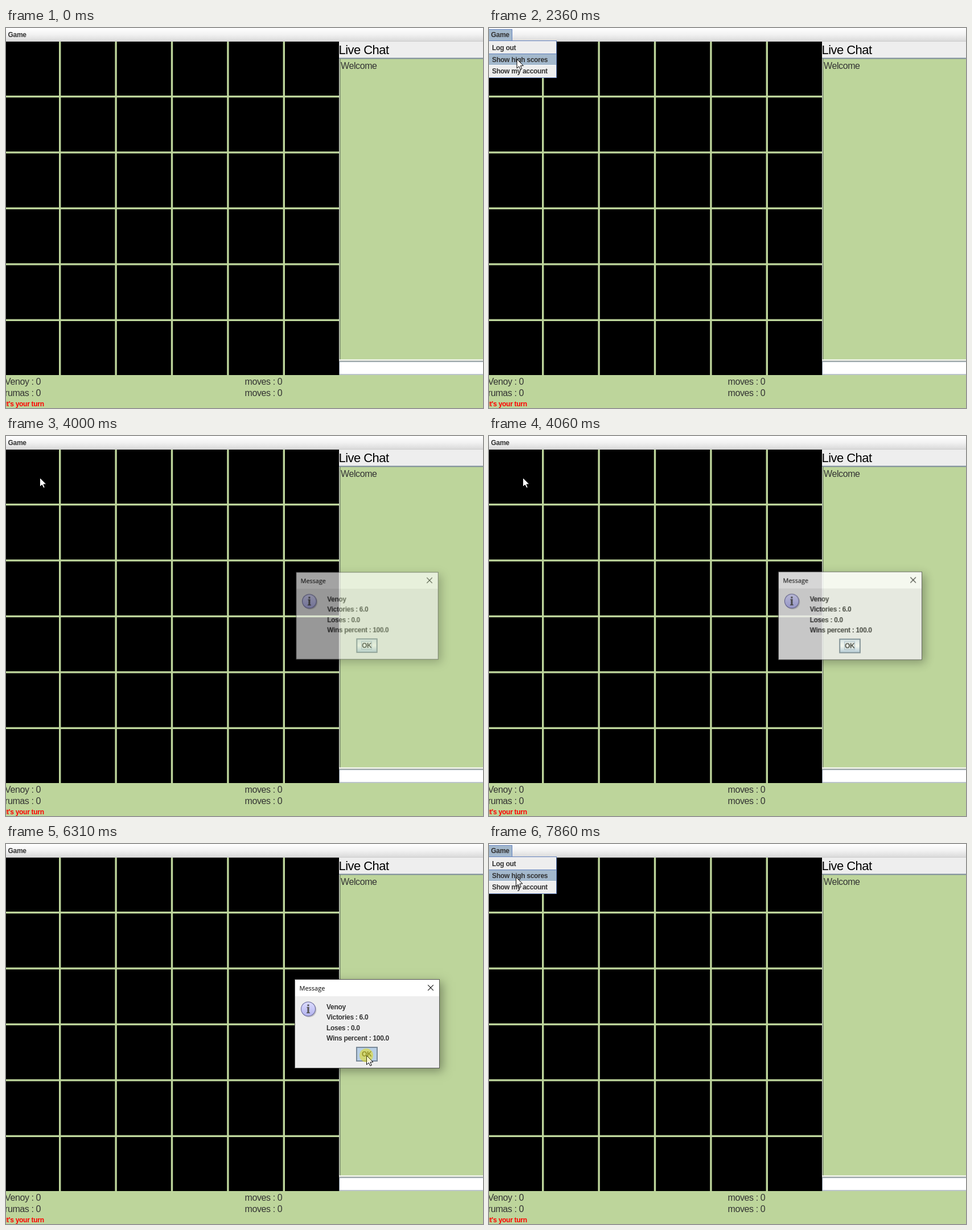
An HTML page with a canvas for the animation above (8 s loop, 838x669 px).

```html
<!DOCTYPE html>
<html lang="en">
<head>
<meta charset="utf-8">
<title>Memory game</title>
<style>
html, body { margin: 0; width: 100%; height: 100%; overflow: hidden; background: #bdd59b; }
canvas { display: block; width: 838px; height: 669px; }
</style>
</head>
<body>
<canvas id="stage" width="838" height="669"></canvas>
<script>
const W = 838, H = 669, LOOP = 8000, STEP = 77;
const GREEN = '#bdd59b', STEEL = '#7a8a99', BLUE = '#6382bf', SELECT = '#a3b8cc', INK = '#333';
const PLAYER = 'Venoy', RIVAL = 'rumas';
const ITEMS = ['Log out', 'Show high scores', 'Show my account'];
const MENU_OPEN = 1820, MENU_PICK = 3760, CONFIRM = 6310, MENU_AGAIN = 7250;
const CLICKS = [MENU_OPEN, MENU_PICK, CONFIRM, MENU_AGAIN];

// Pointer glides; bow lifts the middle of the path
const ENTRY = { x: 980, y: 875 };
const GLIDES = [
  { from: 360, to: 1120, x: 41, y: 11, bow: 40 },
  { from: 1200, to: 1590, x: 16, y: 12, bow: 10 },
  { from: 2210, to: 2750, x: 59, y: 73, bow: 4 },
  { from: 4920, to: 5460, x: 633, y: 372, bow: 0 },
  { from: 6388, to: 6700, x: -40, y: 30, bow: 0 },
  { from: 7000, to: 7080, x: 24, y: 12, bow: 0 },
  { from: 7402, to: 7860, x: 47, y: 58, bow: 0 }
];

const ctx = document.getElementById('stage').getContext('2d');
const layer = document.createElement('canvas');
layer.width = W;
layer.height = H;
const dlg = layer.getContext('2d');

const easeOut = (p, power) => 1 - (1 - p) ** power;
const within = (t, start, length) => t >= start && t < start + length;

function progress(t, from, to) {
  if (t < from) return 0;
  const n = Math.round((to - from) / STEP);
  const k = Math.floor((t - from + 12) / (to - from) * n);
  return Math.min(1, (k + 1) / (n + 1));
}

function pointerAt(t) {
  return GLIDES.reduce((pos, g) => {
    const p = progress(t, g.from, g.to), e = easeOut(p, 3);
    return {
      x: pos.x + (g.x - pos.x) * e,
      y: pos.y + (g.y - pos.y) * e - g.bow * Math.sin(Math.PI * p)
    };
  }, ENTRY);
}

function dialogAlpha(t) {
  return easeOut(progress(t, 3913, 4220), 2) - easeOut(progress(t, 6388, 6700), 2);
}

function rect(c, x, y, w, h, fill) {
  c.fillStyle = fill;
  c.fillRect(x, y, w, h);
}

function text(c, str, x, y, size, weight = 'normal', fill = INK) {
  c.font = `${weight} ${size}px "Liberation Sans", Arial, sans-serif`;
  c.letterSpacing = `${-.025 * size}px`;
  c.fillStyle = fill;
  c.fillText(str, x, y);
}

function disc(c, x, y, r, fill) {
  c.fillStyle = fill;
  c.beginPath();
  c.arc(x, y, r, 0, 7);
  c.fill();
}

function vertical(c, y0, y1, ...colors) {
  const g = c.createLinearGradient(0, y0, 0, y1);
  colors.forEach((color, i) => g.addColorStop(i / (colors.length - 1), color));
  return g;
}

function drawBoard() {
  const pitch = 98.4, gap = 3.4;
  rect(ctx, 0, 24, 585, 587, '#000');
  for (let i = 0; i < 5; i++) {
    rect(ctx, 93 + i * pitch, 24, gap, 587, GREEN);
    rect(ctx, 0, 119 + i * pitch, 585, gap, GREEN);
  }
}

function drawChat() {
  rect(ctx, 585, 24, 253, 29, '#eee');
  text(ctx, 'Live Chat', 584.5, 46, 22, 'normal', '#000');
  rect(ctx, 585, 52.5, 253, 2, STEEL);
  rect(ctx, 585, 54, 1, 530, '#dfe6d6');
  rect(ctx, 586, 54, 1.5, 530, '#75846b');
  text(ctx, 'Welcome', 588, 71.5, 16);
  rect(ctx, 585, 583.5, 253, 27.5, '#fff');
  rect(ctx, 585, 585.5, 253, 1, '#8b9684');
  rect(ctx, 585, 587, 253, 1, STEEL);
  rect(ctx, 585, 587, 1, 24, STEEL);
  rect(ctx, 585, 609.5, 253, 1, STEEL);
}

function drawWindow() {
  rect(ctx, 0, 0, W, H, GREEN);
  rect(ctx, 0, 0, W, 23, vertical(ctx, 0, 23, '#fff', '#f2f2f2', '#dadada'));
  rect(ctx, 0, 23, W, 1, '#ccc');
  text(ctx, 'Game', 3.5, 16.3, 12, 'bold');
  drawBoard();
  drawChat();
  [PLAYER, RIVAL].forEach((name, i) => {
    const y = 627.5 + i * 20.5;
    text(ctx, `${name} : 0`, -2, y, 16);
    text(ctx, 'moves : 0', 419.5, y, 16);
  });
  text(ctx, "it's your turn", -2, 666, 12, 'bold', '#f00');
}

function drawMenu(y) {
  const row = 20.4;
  rect(ctx, 0, 2, 41, 21, BLUE);
  rect(ctx, 0, 3, 40, 19, SELECT);
  text(ctx, 'Game', 3.5, 16.3, 12, 'bold');
  rect(ctx, 0, 22, 119, 66, BLUE);
  rect(ctx, 0, 23, 118, 64, '#eee');
  const hover = Math.floor((y - 25) / row);
  ITEMS.forEach((label, i) => {
    const top = 25 + Math.round(i * row);
    if (i === hover) {
      rect(ctx, 0, top, 118, 20, SELECT);
      rect(ctx, 0, top, 118, 1, BLUE);
      rect(ctx, 0, top + 20, 118, 1, '#fff');
    }
    text(ctx, label, 5.3, 39.4 + i * row, 12, 'bold');
  });
}

function drawInfoIcon(x, y) {
  disc(dlg, x + 1.5, y + 1.5, 13, '#c4c4c8');
  disc(dlg, x, y, 13, '#666699');
  disc(dlg, x, y, 12, vertical(dlg, y - 12, y + 12, '#dcdcff', '#b4b4ee'));
  rect(dlg, x - 1.5, y - 8, 3, 3, '#555');
  rect(dlg, x - 2.5, y - 3.5, 4, 1.5, '#555');
  rect(dlg, x - 1.5, y - 3.5, 3, 10, '#555');
  rect(dlg, x - 3, y + 6, 6, 1.5, '#555');
}

function drawCross(x, y, r) {
  dlg.strokeStyle = '#111';
  dlg.lineWidth = 1.1;
  dlg.beginPath();
  for (const side of [-1, 1]) {
    dlg.moveTo(x - r, y - r * side);
    dlg.lineTo(x + r, y + r * side);
  }
  dlg.stroke();
}

function drawButton(pressed) {
  rect(dlg, 615, 357, 38, 26, STEEL);
  rect(dlg, 617, 359, 34, 22,
    pressed ? '#b8cfe5' : vertical(dlg, 359, 381, '#dde8f3', '#fff', '#b8cfe5'));
  if (!pressed) {
    dlg.strokeStyle = SELECT;
    dlg.lineWidth = 1;
    dlg.strokeRect(624.5, 362.5, 18, 14);
  }
  text(dlg, 'OK', 625, 374.3, 12, 'bold');
}

function drawDialog(alpha, pressed) {
  dlg.clearRect(0, 0, W, H);
  dlg.save();
  dlg.shadowColor = 'rgba(0,0,0,.34)';
  dlg.shadowBlur = 16;
  dlg.shadowOffsetX = dlg.shadowOffsetY = 5;
  rect(dlg, 507, 238, 255, 157, '#555');
  dlg.restore();
  rect(dlg, 508, 239, 253, 29, '#fff');
  rect(dlg, 508, 268, 253, 126, '#eee');
  dlg.letterSpacing = '0px';
  dlg.font = '11px "Open Sans", sans-serif';
  dlg.fillStyle = '#000';
  dlg.fillText('Message', 515.5, 258);
  drawCross(746, 253, 4.8);
  drawInfoIcon(531, 290.5);
  [PLAYER, 'Victories : 6.0', 'Loses : 0.0', 'Wins percent : 100.0'].forEach((line, i) =>
    text(dlg, line, 563, 290.8 + i * 18.4, 12, 'bold'));
  drawButton(pressed);

  const scale = .95 + .05 * alpha;
  ctx.save();
  ctx.globalAlpha = alpha;
  ctx.translate(634.5, 316.5);
  ctx.scale(scale, scale);
  ctx.drawImage(layer, -634.5, -316.5);
  ctx.restore();
}

function drawPointer(x, y) {
  ctx.save();
  ctx.translate(x + .5, y + .5);
  ctx.fillStyle = '#fff';
  ctx.strokeStyle = '#000';
  ctx.lineWidth = 1;
  const arrow = new Path2D('M0 0V16L3.7 12.6L6.4 18L8.8 17L6.4 11.6L11.4 11.4Z');
  ctx.fill(arrow);
  ctx.stroke(arrow);
  ctx.restore();
}

function render(t) {
  const { x, y } = pointerAt(t);
  const alpha = dialogAlpha(t);
  const click = CLICKS.some(start => within(t, start, 70));

  drawWindow();
  if (within(t, MENU_OPEN, MENU_PICK + 70 - MENU_OPEN) || t >= MENU_AGAIN) drawMenu(y);
  if (alpha > 0) drawDialog(alpha, within(t, CONFIRM, 70));
  if (t < GLIDES[0].from) return;
  if (click) disc(ctx, x, y, 12, 'rgba(228,222,30,.42)');
  drawPointer(x, y);
  if (click) disc(ctx, x, y, 12, 'rgba(228,222,30,.25)');
}

const begin = performance.now();
function tick() {
  render((performance.now() - begin) % LOOP);
  requestAnimationFrame(tick);
}
tick();
</script>
</body>
</html>
```
